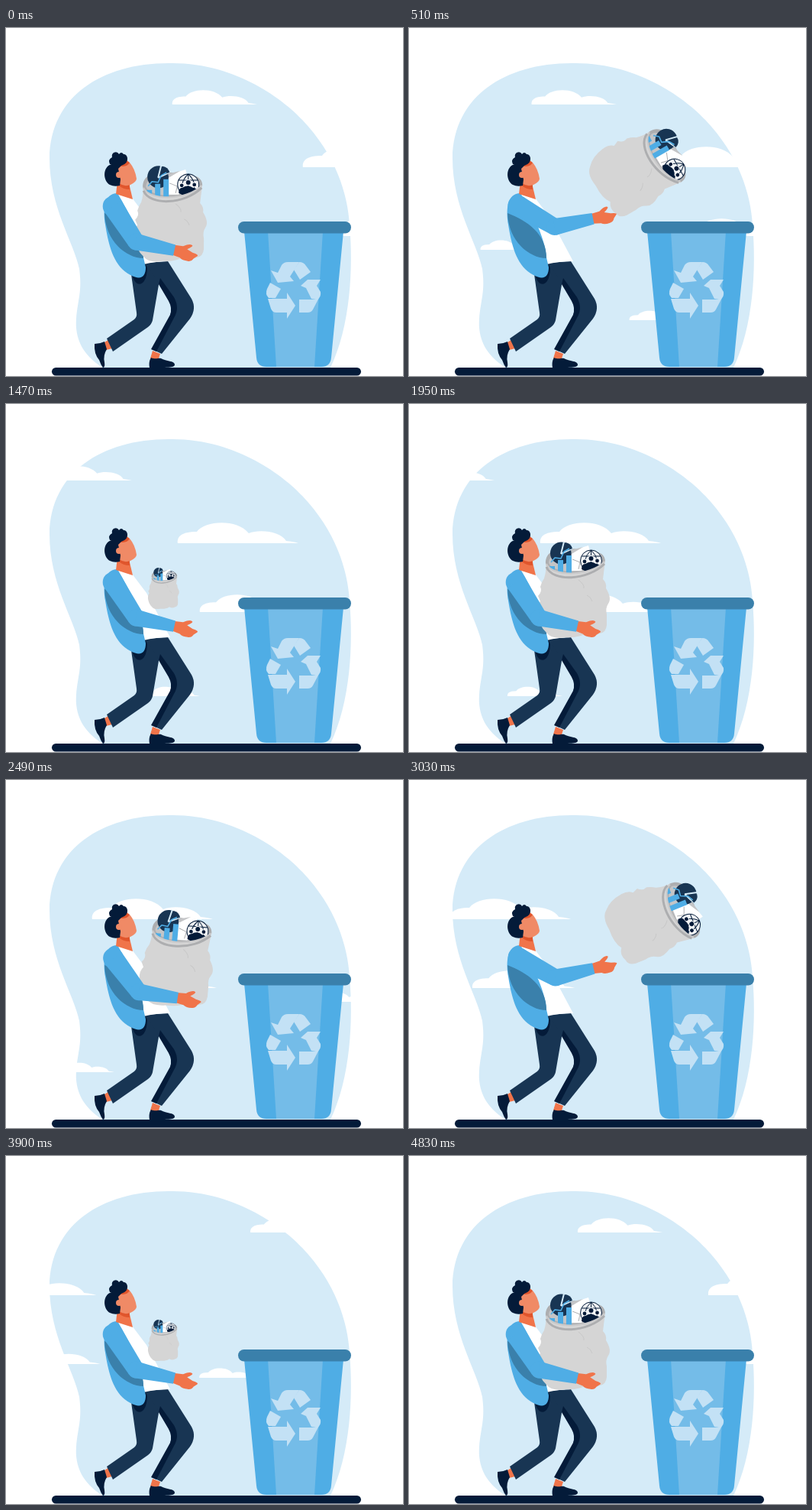
These frames come from a looping animation (520x455 px, 4860 ms). An HTML page with a canvas:

```html
<!DOCTYPE html>
<html lang="en">
<head>
<meta charset="utf-8">
<title>Recycling</title>
<style>
html, body { margin: 0; width: 100%; height: 100%; overflow: hidden; background: #fff; }
canvas { display: block; }
</style>
</head>
<body>
<canvas id="stage" width="520" height="455"></canvas>
<script>
const ctx = document.getElementById('stage').getContext('2d');
const LOOP = 4860, THROW = 2430, DRIFT = 531;
const NAVY = '#041b39', PANTS = '#183553', BLUE = '#4fade5', TEAL = '#3a80ab';
const SKIN = '#f08a66', ORANGE = '#f0744a', SHADOW = '#e0552c';
const SKY = '#d5ebf8', GREY = '#d5d5d5', RIM = '#adaeb0';

const clamp = v => Math.max(0, Math.min(1, v));
const mix = (a, b, k) => a + (b - a) * k;
const rad = deg => deg * Math.PI / 180;

function fill(path, color) {
  ctx.fillStyle = color;
  ctx.fill(new Path2D(path));
}
function line(path, color, width) {
  ctx.strokeStyle = color;
  ctx.lineWidth = width;
  ctx.stroke(new Path2D(path));
}
function disc(x, y, r, color) {
  ctx.fillStyle = color;
  ctx.beginPath();
  ctx.arc(x, y, r, 0, Math.PI * 2);
  ctx.fill();
}
function pill(x, y, w, h, r, color) {
  ctx.fillStyle = color;
  ctx.beginPath();
  ctx.roundRect(x, y, w, h, r);
  ctx.fill();
}

// left edge at loop start, baseline, width
const clouds = [[218, 100, 111], [389, 182, 158], [418, 272, 134], [151, 290, 74], [346, 382, 72]];

function drawClouds(t) {
  const u = t / LOOP;
  const moved = DRIFT * (u + 0.03 * u * (1 - u));
  for (const [start, base, width] of clouds) {
    let x = start - moved;
    if (x < -101) x += DRIFT;
    ctx.save();
    ctx.translate(x, base);
    ctx.scale(width / 158, width / 158);
    fill('M0 0C-1 -8 4 -15 25 -15C36 -30 78 -32 93 -13C108 -19 135 -15 142 -3Q152 -2 158 0Z', '#fff');
    ctx.restore();
  }
}

function drawBackdrop() {
  fill('M213 46C300 44 365 95 388 120C432 166 448 218 450 258C455 315 451 390 425 444L127 444' +
    'C100 428 90 405 92 380C94 355 100 345 96 315C89 280 57 235 57 170C58 90 125 46 213 46Z', SKY);
}

function drawBody() {
  // feet
  fill('M129 411L135 407L139 419L131 421Z', ORANGE);
  fill('M116 413Q123 413 129 410L132 420Q127 428 129 437Q130 444 127 444Q124 440 122 434Q115 426 116 413Z', NAVY);
  fill('M192 422L202 426L199 435L189 432Z', ORANGE);
  fill('M190 431C196 434 200 431 203 432C210 436 221 435 221 440C221 444 215 444 188 444C187 438 188 434 190 431Z', NAVY);
  // legs
  fill('M164 322L185 307L205 308L201 330L192 382Q191 387 186 391L140 423L132 406L168 381Q172 378 171 372Z', PANTS);
  fill('M183 307L212 305L243 354Q250 367 241 380L204 426L191 420L215 376Q219 366 213 356L200 334Z', PANTS);
  fill('M202 327L220 352Q228 366 220 379L197 423L190 420L215 375Q218 366 213 357L200 335Z', NAVY);
  fill('M165 321C168 340 184 341 185 314L182 306Z', NAVY);
  // shirt and jacket
  fill('M146 217L165 222L184 247L215 305Q196 305 180 309L160 270Z', '#fff');
  fill('M146 216C128 216 127 238 130 257C135 288 142 312 163 323C176 330 183 326 183 313L180 300C178 272 160 240 146 216Z', BLUE);
  fill('M129 242C154 252 180 268 180 301C157 301 130 278 129 242Z', TEAL);
  // head
  fill('M146 200L161 203L166 224L144 217Z', ORANGE);
  fill('M148 203L162 204L162 211Q153 211 148 206Z', SHADOW);
  fill('M146 181L162 176Q169 184 171 197Q171 201 163 205Q155 208 148 203Z', SKIN);
  fill('M147 180Q158 183 162 176L158 173L147 174Z', SHADOW);
  fill('M138 178C126 182 127 200 136 205Q142 208 149 206L150 198L147 184L151 180Q160 177 159 170' +
    'Q158 165 154 165Q151 161 148 165Q146 161 141 163Q138 165 139 169Q133 172 136 178Z', NAVY);
  disc(148, 192, 4, SKIN);
}

function drawContents() {
  // pie chart
  disc(199.5, 195, 14.5, PANTS);
  line('M199 196L203 180M199 196L214 189', SKY, 2);
  fill('M205 181Q212 182 214 189L203 193Z', PANTS);
  // paper
  fill('M213 192L235 185L238 196L226 218L211 218Z', '#fff');
  fill('M212 191L228 187L213 196Z', '#c4c5c7');
  line('M214 203L224 207L222 216', RIM, 1);
  // bars with trend line
  ctx.fillStyle = BLUE;
  ctx.fillRect(184, 212, 7, 12);
  ctx.fillRect(195, 204, 7, 20);
  ctx.fillRect(206, 198, 7, 26);
  line('M186 207L191 201L199 202L203 193L210 189', BLUE, 1.6);
  // globe with people
  disc(238.5, 205, 14, '#eef0f2');
  line('M224.5 205A14 14 0 1 1 252.5 205A14 14 0 1 1 224.5 205M238.5 191V218M226 199H251' +
    'M238.5 191Q225 204 234 218M238.5 191Q252 204 243 218', NAVY, 1);
  for (const [x, y, r] of [[238.5, 202, 3], [230, 206, 2.4], [246.5, 205, 2.4]]) {
    disc(x, y, r + 1, '#fff');
    disc(x, y, r, NAVY);
  }
  fill('M226 216Q226 209 231 209Q238 204 245 209Q250 209 252 215L238 222Z', NAVY);
}

function drawBag({ x, y, angle = 0, scale = 1 }) {
  ctx.save();
  ctx.translate(x, y);
  ctx.rotate(rad(angle));
  ctx.scale(scale, scale);
  ctx.translate(-217, -243);
  ctx.lineJoin = 'round';
  fill('M179 209C178 187 205 188 222 190C247 191 257 195 257 206C245 226 190 230 179 209Z', RIM);
  fill('M183 208C184 193 205 191 222 193C244 194 253 198 253 206C240 222 190 224 183 208Z', '#c4c5c7');
  drawContents();
  fill('M179 208C185 226 238 226 257 205L254 229Q259 234 258 241Q266 254 261 261Q257 267 259 275' +
    'L259 289Q258 299 250 300Q241 305 233 299Q224 306 205 305Q187 308 180 299Q170 290 168 273' +
    'Q167 263 172 258L169 251Q175 245 172 239Q174 232 177 228Q180 219 179 208Z', GREY);
  line('M180 209C187 226 237 226 256 206', '#c9c9ca', 2);
  line('M180 213C188 233 234 231 256 209', RIM, 3);
  line('M222 230Q230 236 229 241M233 250Q238 252 240 258', '#c8c8c8', 1);
  ctx.restore();
}

// time, x, y, angle
const flight = [
  [0, 217, 243, 0], [60, 226, 234, 5], [300, 267, 205, 35], [510, 304, 185.5, 60],
  [600, 324, 183.5, 68], [750, 354, 191, 80], [900, 374, 226, 93], [1080, 380, 325, 102]
];

function along(keys, t) {
  const last = keys.length - 1;
  let i = 0;
  while (i < last - 1 && t >= keys[i + 1][0]) i++;
  const a = keys[i], b = keys[i + 1];
  const prev = keys[Math.max(0, i - 1)], next = keys[Math.min(last, i + 2)];
  const span = b[0] - a[0], s = (t - a[0]) / span;
  return [1, 2, 3].map(c => {
    const m0 = (b[c] - prev[c]) / (b[0] - prev[0]) * span;
    const m1 = (next[c] - a[c]) / (next[0] - a[0]) * span;
    return (2 * s ** 3 - 3 * s * s + 1) * a[c] + (s ** 3 - 2 * s * s + s) * m0 +
      (3 * s * s - 2 * s ** 3) * b[c] + (s ** 3 - s * s) * m1;
  });
}

function bagPhase(t) {
  if (t < 1080) {
    const [x, y, angle] = along(flight, t);
    ctx.save();
    if (t > 600) {
      ctx.beginPath();
      ctx.rect(0, 0, 520, 260);
      ctx.clip();
    }
    drawBag({ x, y, angle });
    ctx.restore();
  } else if (t > 1320) {
    const scale = clamp((t - 1320) / 350);
    drawBag({ x: mix(199.5, 217, scale), y: mix(239.5, 243, scale), scale });
  }
}

function limb(x1, y1, r1, x2, y2, r2) {
  const a = Math.atan2(y2 - y1, x2 - x1), nx = -Math.sin(a), ny = Math.cos(a);
  ctx.beginPath();
  ctx.moveTo(x1 + nx * r1, y1 + ny * r1);
  ctx.lineTo(x2 + nx * r2, y2 + ny * r2);
  ctx.lineTo(x2 - nx * r2, y2 - ny * r2);
  ctx.lineTo(x1 - nx * r1, y1 - ny * r1);
  ctx.fill();
}

function drawArm(t) {
  const lift = t < 680 ? Math.sin(Math.PI / 2 * t / 680)
    : (1 + Math.cos(Math.PI * clamp((t - 680) / 160))) / 2;
  const upper = rad(mix(57, 28, lift)), fore = rad(mix(12.5, -14, lift));
  const sx = mix(140, 143, lift), sy = mix(233, 232, lift);
  const ex = sx + 55.5 * Math.cos(upper), ey = sy + 55.5 * Math.sin(upper);
  const wx = ex + 51.5 * Math.cos(fore), wy = ey + 51.5 * Math.sin(fore);
  ctx.save();
  ctx.translate(wx, wy);
  ctx.rotate(fore);
  fill('M-3 -6.5L10 -7.7Q19 -14 22 -11Q22 -9 16 -5L24 -2Q33 -1 31 1L27 5Q25 10 20 10Q13 11 9 8L-1 6.5Z', ORANGE);
  ctx.restore();
  disc(sx, sy, 13.3, BLUE);
  limb(sx, sy, 13.3, ex, ey, 11);
  disc(ex, ey, 11, BLUE);
  limb(ex, ey, 11, wx, wy, 7.3);
}

function drawBin() {
  fill('M312 266H442L426 431Q425 443 413 443H341Q329 443 328 431Z', BLUE);
  fill('M343 266H415L404 443H354Z', '#74bce8');
  pill(304, 253, 148, 15.5, 7.7, TEAL);
  const arrows = [
    'M347 317L356 320L361 310Q364 306 369 306H384L372 325L377 331L356 333Z',
    'M384 306Q390 306 393 311L399 319L385 329L377 316Z',
    'M346 333L360 341L353 353H344Q339 348 342 341Z',
    'M343 354H368V346L379 363L368 380V372H354Q349 372 347 367Z',
    'M384 355H401Q408 355 412 349L402 368Q400 372 395 372H384Z',
    'M386 337L395 329H412L407 337L412 345Q413 351 408 355L400 354L393 340Z'
  ];
  for (const a of arrows) fill(a, '#c3e1f5');
}

function draw(now) {
  const t = now % LOOP, phase = t % THROW;
  ctx.fillStyle = '#fff';
  ctx.fillRect(0, 0, 520, 455);
  drawBackdrop();
  drawClouds(t);
  drawBody();
  bagPhase(phase);
  drawArm(phase);
  drawBin();
  pill(60, 444, 405, 10.5, 5.2, NAVY);
}

const begin = performance.now();
function tick() {
  draw(performance.now() - begin);
  requestAnimationFrame(tick);
}
tick();
</script>
</body>
</html>
```
